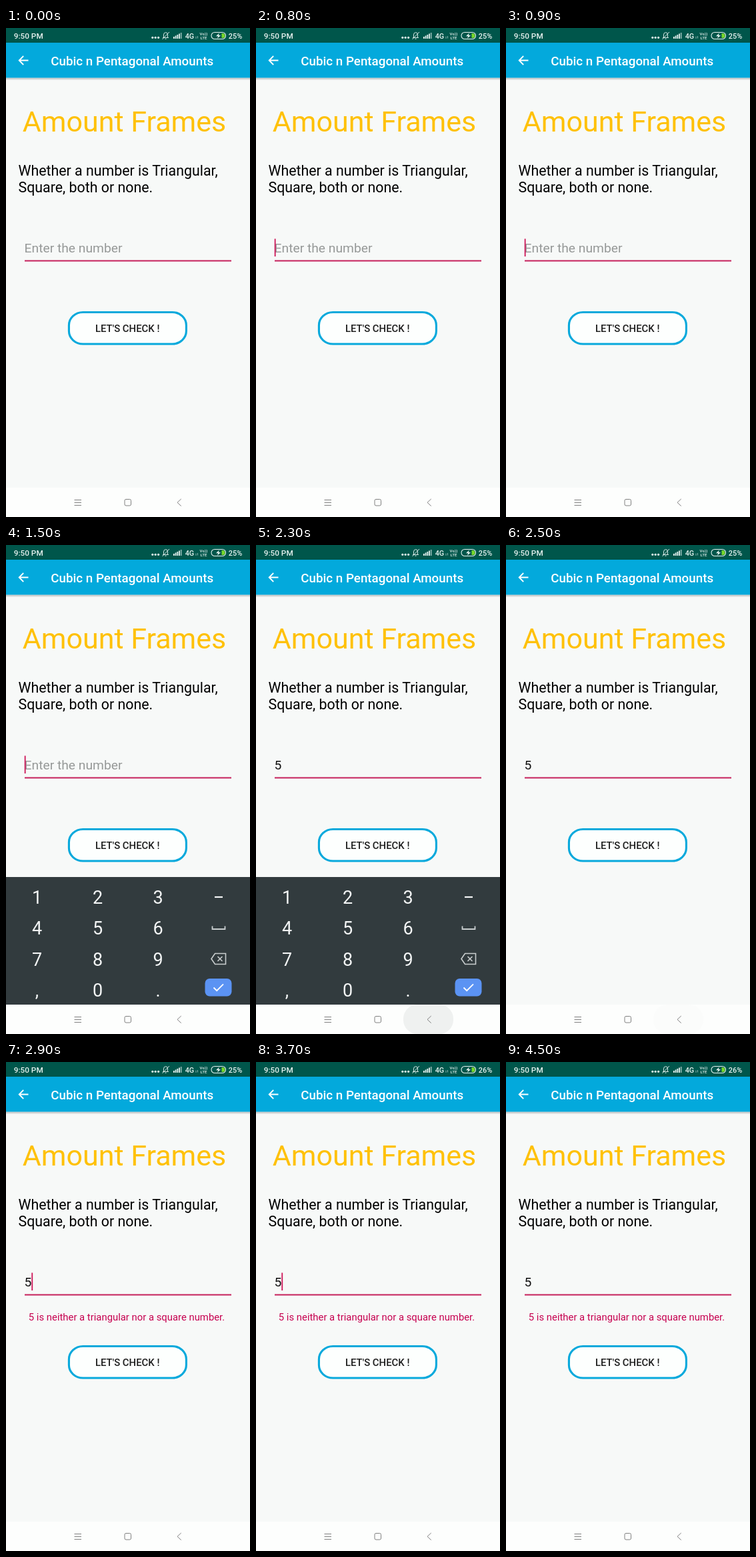
An HTML page for the animation above (4700 ms loop, 366 px wide and 732 px high).

```html
<!DOCTYPE html>
<html lang="en">
<head>
<meta charset="utf-8">
<title>Number check</title>
<style>
  html, body { margin: 0; width: 100%; height: 100%; overflow: hidden; background: #f7f9f8; }
  svg { display: block; width: 100%; height: 100%; font-family: Roboto, sans-serif; }
  .medium { font-weight: 500; }
  .line { fill: none; }
  .mid { text-anchor: middle; }
</style>
</head>
<body>
<svg viewBox="0 0 366 732">
  <defs>
    <linearGradient id="shade" x2="0" y2="1">
      <stop stop-color="#000" stop-opacity=".25"/>
      <stop offset="1" stop-color="#000" stop-opacity="0"/>
    </linearGradient>
  </defs>
  <rect width="366" height="732" fill="#f7f9f8"/>

  <!-- status bar -->
  <rect width="366" height="22" fill="#00564b"/>
  <g fill="#e8f2f0" class="medium">
    <text x="11.7" y="15.5" font-size="11.8">9:50 PM</text>
    <circle cx="219.8" cy="14.3" r="1.6"/><circle cx="224.2" cy="14.3" r="1.6"/><circle cx="228.6" cy="14.3" r="1.6"/>
    <g class="line" stroke="#e8f2f0">
      <path d="M235 14.5h9M236.5 14V10q0-3 3-3.3t3 3.3V14M238.5 16.3h2M234.5 17L245 6" stroke-width=".9"/>
      <path d="M285 12.5v3.5M287.5 12v3.5" stroke-width=".8" opacity=".7"/>
      <rect x="308" y="6.5" width="21.5" height="10" rx="5" stroke-width="1.1"/>
    </g>
    <path d="M251 13h1.800v3h-1.800zM253.700 11.500h1.800v4.500h-1.800zM256.400 10h1.800v6h-1.800zM259.100 8.500h1.800v7.500h-1.800z"/>
    <path d="M261.800 7h1.800v9h-1.800z" opacity=".6"/>
    <text x="268.7" y="15.5" font-size="10.8">4G</text>
    <g font-size="6.2" class="mid">
      <text x="296.5" y="10.8">Vo))</text>
      <text x="296.5" y="17">LTE</text>
    </g>
    <path d="M323.500 8h1.500a3.500 3.500 0 0 1 0 7h-1.500z" fill="#77d62b"/>
    <path d="M320 7.500l-5 4.700h3.200l-1.200 3.600 5-4.800h-3.200z"/>
    <text id="charge" x="333.7" y="15.5" font-size="11">25%</text>
  </g>

  <!-- app bar -->
  <rect y="74.5" width="366" height="4" fill="url(#shade)"/>
  <rect y="22" width="366" height="52.5" fill="#03a9dc"/>
  <path d="M33.5 48.5H20M26.200 42l-6.500 6.500 6.500 6.500" class="line" stroke="#fff" stroke-width="1.8"/>
  <text x="189.2" y="56" font-size="18.8" fill="#fff" class="medium mid">Cubic n Pentagonal Amounts</text>

  <!-- page -->
  <text x="177.5" y="155.3" font-size="43" fill="#ffc107" class="mid">Amount Frames</text>
  <g font-size="21.35">
    <text x="18.5" y="220.5">Whether a number is Triangular,</text>
    <text x="18.5" y="245.5">Square, both or none.</text>
  </g>
  <text id="field" x="27.6" y="336" font-size="19.25"></text>
  <rect id="cursor" y="315.5" width="1.9" height="26.5" fill="#d01f5f"/>
  <rect x="28" y="347.5" width="310" height="2" fill="#c6205c"/>
  <text id="result" x="181" y="387" font-size="14.85" fill="#c6004f" class="mid">5 is neither a triangular nor a square number.</text>
  <rect x="94.4" y="425.5" width="176" height="47.5" rx="21" ry="19.5" fill="#fdfffe" stroke="#08a9dc" stroke-width="3.1"/>
  <text x="182.2" y="455.3" font-size="14.9" fill="#1e1e1e" class="medium mid">LET'S CHECK !</text>

  <!-- keyboard -->
  <g id="keyboard">
    <rect y="497" width="366" height="191" fill="#323b3e"/>
    <rect id="press" x="95" y="552" width="86" height="43" rx="6" fill="#fff"/>
    <g id="keys" font-size="27" fill="#f4f6f6" class="mid"></g>
    <g class="line" stroke="#c9cecf" stroke-width="1.8">
      <path d="M313 527h12" stroke="#f4f6f6" stroke-width="2.2"/>
      <path d="M309.5 570.5v4.500h19v-4.500"/>
      <path d="M313.500 611.500H329.500V627.500H313.500L308 619.500zM317.500 616l7 7M324.500 616l-7 7" stroke-width="1.6"/>
    </g>
    <rect x="298.5" y="649" width="40" height="26.5" rx="7" fill="#5b93f3"/>
    <path d="M311.500 662.500l4.700 4.700 9.800-9.800" class="line" stroke="#fff" stroke-width="1.9"/>
  </g>

  <!-- navigation bar -->
  <rect y="688" width="366" height="44" fill="#fdfefd"/>
  <rect id="ripple" x="221" y="688" width="75" height="44" rx="21" fill="#eff1f0"/>
  <g class="line" stroke="#808080">
    <path d="M102.500 706.500h10.500M102.500 710.500h10.500M102.500 714.500h10.500"/>
    <rect x="178" y="705.5" width="9.5" height="9.5" rx="2"/>
    <path d="M262.700 705l-5.700 5.300 5.700 5.300"/>
  </g>
</svg>
<script>
const LOOP = 4700, STEP = 100;
const $ = id => document.getElementById(id);
const ramp = (t, from, to) => Math.min(1, Math.max(0, (t - from) / (to - from)));
const within = (t, spans) => spans.some(([from, to]) => t >= from && t < to);
const cursorSpans = [[600, 1100], [1500, 2200], [2700, 3300], [3700, 4200]];

$('keys').innerHTML = [...'123456789,0.'].map((key, i) =>
  `<text x="${[46.5, 137.5, 228][i % 3]}" y="${536.8 + 46.4 * Math.floor(i / 3)}">${key}</text>`).join('');

function draw(t) {
  const typed = t >= 2000;
  $('field').textContent = typed ? '5' : 'Enter the number';
  $('field').setAttribute('fill', typed ? '#111' : '#969998');
  $('cursor').setAttribute('x', typed ? 38.3 : 27.7);
  $('cursor').setAttribute('opacity', +within(t, cursorSpans));
  $('result').setAttribute('opacity', +(t >= 2800));
  $('charge').textContent = t < 3500 ? '25%' : '26%';

  const shown = 1 - (1 - ramp(t, 900, 1200)) ** 2 - ramp(t, 2300, 2500);
  $('keyboard').setAttribute('opacity', shown);
  $('keyboard').setAttribute('transform', `translate(0 ${19 * (1 - shown)})`);
  $('press').setAttribute('opacity', t < 1900 ? 0 : .12 * (1 - ramp(t, 2000, 2300)));
  $('ripple').setAttribute('opacity', ramp(t, 2100, 2300) - .85 * ramp(t, 2300, 2500) - .15 * ramp(t, 2500, 2600));
}

function tick() {
  draw(Math.floor(performance.now() % LOOP / STEP) * STEP);
  requestAnimationFrame(tick);
}
tick();
</script>
</body>
</html>
```
